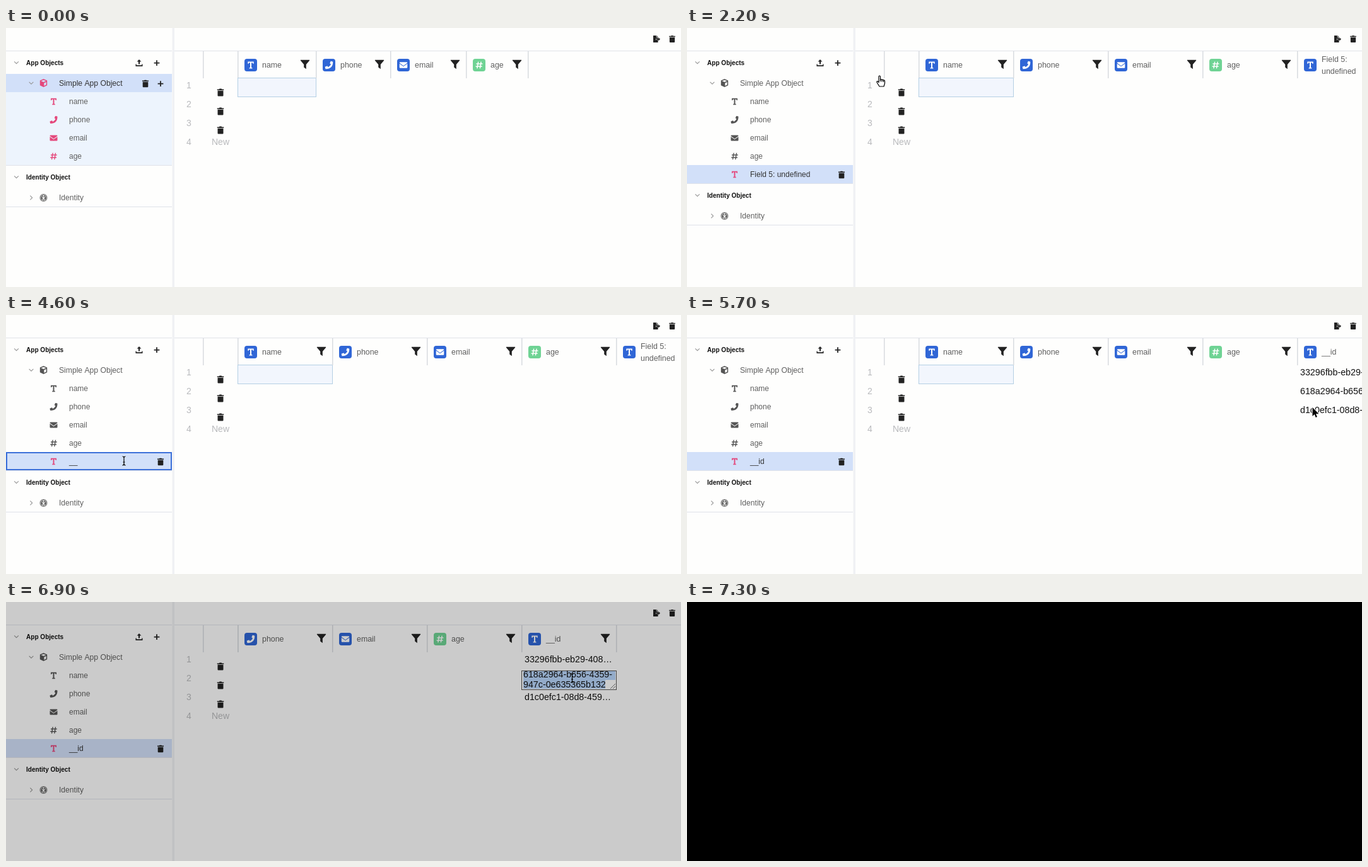
Recreate the animation shown at these times as an HTML page with a canvas. Size 1070x412 px, loop 7400 ms.

```html
<!DOCTYPE html>
<html lang="en">
<meta charset="utf-8">
<title>Object table editor</title>
<style>
html, body { margin: 0; width: 100%; height: 100%; overflow: hidden; background: #fefefd }
canvas { display: block }
</style>
<canvas id="stage" width="1070" height="412"></canvas>
<script>
const c = document.getElementById('stage').getContext('2d');
const LOOP = 7400, SANS = '"Liberation Sans", Arial, sans-serif';
const INK = '#222', GREY = '#606060', PINK = '#e4487c', LINE = '#dfe2e9';
const BLUE = '#3066d6', GREEN = '#6fd394', TEAL = '#6bdbd0', YELLOW = '#f6d261';

// Icons on a 16-unit grid; a second entry is a stroke width.
const ICONS = {
  text: ['M2 1H14V5.2H12V3.2H9.3V13H11V15H5V13H6.7V3.2H4V5.2H2Z'],
  phone: ['M15.4.8L12.2 0Q11.6 0 11.3.4L9.8 4Q9.7 4.5 10 4.8L12 6.4Q10.2 10.2 6.4 12L4.8 10Q4.5 9.7 4 9.8L.4 11.3Q-.1 11.6 0 12.2L.8 15.4Q1 16 1.5 16Q16 15.5 16 1.5Q16 1 15.4.8Z'],
  email: ['M0 3.5Q0 2 1.5 2H14.5Q16 2 16 3.5L8 9.5ZM0 5.2L8 11 16 5.2V12.5Q16 14 14.5 14H1.5Q0 14 0 12.5Z'],
  number: ['M6.3 1L4 15M12 1L9.7 15M2 5.3H15M1 10.7H14', 1.9],
  currency: ['M12 4.5Q11 3 8 3Q4.3 3 4.3 5.4Q4.3 7.4 8 8Q12 8.6 12 10.8Q12 13 8 13Q5 13 4 11.4M8 .5V15.5', 1.9],
  boolean: ['M5 3H11A5 5 0 0 1 11 13H5A5 5 0 0 1 5 3ZM5 4.5H11A3.5 3.5 0 0 1 11 11.5H5A3.5 3.5 0 0 1 5 4.5ZM5.5 5A3 3 0 1 1 5.4 5Z'],
  date: ['M1 2H4V0H6V2H10V0H12V2H15V4.5H1ZM1 5.5H15V15H1Z'],
  time: ['M8 0A8 8 0 1 1 7.9 0ZM7.1 3H8.9V8L11.5 10 10.5 11.3 7.1 8.8Z'],
  datetime: ['M0 2H3V0H5V2H8V0H10V2H12V4.5H0ZM0 5.5H6V14H0ZM11 6A5 5 0 1 1 10.9 6ZM10.3 8H11.7V10.7L13.5 12 12.7 13 10.3 11.5Z'],
  trash: ['M2 4.2H14V14.5Q14 16 12.5 16H3.5Q2 16 2 14.5ZM1 1.2H5L6 0H10L11 1.2H15V3.2H1Z'],
  funnel: ['M.5 0H15.5Q16.3 0 15.8 1L10 8V16L6 13V8L.2 1Q-.3 0 .5 0Z'],
  upload: ['M8 0L13 5H9.5V11H6.5V5H3ZM0 11H2V13.5H14V11H16V16H0Z'],
  leave: ['M0 0H7V4H11V7H6V10H11V16H0ZM8 0L11 3H8ZM12 4.5L16 8.5 12 12.5V9.7H7V7.3H12Z'],
  cube: ['M8 0L15 3V12.5L8 16 1 12.5V3ZM8 2L3 4 8 6 13 4ZM9 8V13.5L13.2 11.5V6Z'],
  person: ['M8 0A8 8 0 1 1 7.9 0ZM8 1.2A6.8 6.8 0 1 1 7.9 1.2ZM8 1.9A6.1 6.1 0 1 1 7.9 1.9ZM8 2.8A1.3 1.3 0 1 1 7.9 2.8ZM4 5.5L7 6.3H9L12 5.5V6.7L9.5 7.5V9L10.8 13H9.5L8 10 6.5 13H5.2L6.5 9V7.5L4 6.7Z'],
  plus: ['M8 1V15M1 8H15', 2.8],
  down: ['M2 5L8 11 14 5', 2],
  right: ['M5 2L11 8 5 14', 2]
};
const CURSORS = {
  arrow: 'M0 0V14L3.2 11 5.2 16 7.4 15 5.4 10.3H10Z',
  point: 'M-1 1Q0-1 1.5 1V6Q3 5 4 6.5Q5.5 5.5 6.5 7Q8.5 6.5 8.5 9V12L7 17H0L-4 10.5Q-4.5 8-2.5 9L-1 10.5Z',
  open: 'M-4 8L-7 2Q-7.5 0-5.5 0L-4 2-5.5-4Q-5-6-3.5-5L-2-1V-6Q-1-8 .5-6.5L1-1 2-6Q3.5-7.5 4.5-5.5L4 0 5.5-3.5Q7.5-4 7.5-2L5.5 5 5 8Z',
  beam: 'M-2.5-7Q0-7 0-5V5Q0 7-2.5 7M2.5-7Q0-7 0-5M0 5Q0 7 2.5 7M-1.5 2H1.5'
};
// time, x, y, shape from then on
const TRACK = [
  [100, 420, 240, 'arrow'], [700, 241, 97, 'point'], [1400, 241, 97, 'point'],
  [1900, 305, 76, 'point'], [2400, 305, 76, 'arrow'], [3100, 187, 232, 'open'],
  [4000, 187, 232, 'beam'], [5000, 187, 232, 'arrow'], [5700, 991.5, 147, 'arrow'],
  [6200, 991.5, 147, 'arrow'], [6400, 897.5, 121, 'beam'], [6900, 897.5, 121, 'beam'],
  [7000, 894, 142, 'arrow'], [7100, 891.5, 161, 'arrow']
];
const FIELDS = [['text', 'name', BLUE], ['phone', 'phone', BLUE], ['email', 'email', BLUE], ['number', 'age', GREEN]];
const MENU = [['Text', BLUE], ['Phone', BLUE], ['Email', BLUE], ['Number', GREEN], ['Currency', GREEN],
  ['Boolean', TEAL], ['Date', YELLOW], ['Time', YELLOW], ['DateTime', YELLOW]];
const IDS = ['33296fbb-eb29-408…', '618a2964-b656-435…', 'd1c0efc1-08d8-459…'];

const clamp = v => Math.min(1, Math.max(0, v));
const ease = v => v * v * (3 - 2 * v);

function box(x, y, w, h, color) { c.fillStyle = color; c.fillRect(x, y, w, h); }

function round(x, y, w, h, r, color) {
  c.fillStyle = color;
  c.beginPath();
  c.roundRect(x, y, w, h, r);
  c.fill();
}

function frame(x, y, w, h, color, width = 1) {
  c.strokeStyle = color;
  c.lineWidth = width;
  c.strokeRect(x, y, w, h);
}

function label(text, x, y, size, color = GREY, weight = '', align = 'left') {
  c.font = `${weight} ${size}px ${SANS}`;
  c.textAlign = align;
  c.fillStyle = color;
  c.fillText(text, x, y);
}

function icon(name, x, y, size, color = INK) {
  const [d, stroke] = ICONS[name], path = new Path2D(d);
  c.save();
  c.translate(x - size / 2, y - size / 2);
  c.scale(size / 16, size / 16);
  c.fillStyle = c.strokeStyle = color;
  c.lineWidth = stroke;
  stroke ? c.stroke(path) : c.fill(path, 'evenodd');
  c.restore();
}

function badge(name, x, y, color) {
  round(x - 10, y - 10, 20, 20, 4, color);
  icon(name, x, y, 12.5, '#fff');
}

function selectRow(y, focused, grip) {
  box(0, y, 263, 29, '#d2e0f9');
  if (focused) frame(1, y + 1, 261, 27, '#3c70d9', 2);
  if (grip) for (const x of [6.5, 9.8]) box(x, y + 9, 1.5, 11, INK);
}

function sidebar(t) {
  const added = t >= 2000, shift = added ? 29 : 0;
  box(0, 36, 263, 1, LINE);
  box(0, 218 + shift, 263, 1, LINE);
  box(0, 284 + shift, 263, 1, LINE);
  box(263.5, 0, 3.5, 412, '#f0f1f4');

  icon('down', 16.5, 55, 9, '#999');
  label('App Objects', 32, 59, 10.05, '#111', 'bold');
  icon('upload', 211, 55.5, 11);
  icon('plus', 239, 55.5, 10);

  if (!added) {
    box(0, 102, 263, 116, '#edf4fd');
    const focused = t >= 1000;
    selectRow(73, focused, focused);
    icon('trash', 221, 88.5, 11.5);
    const hover = t >= 700;
    if (hover) round(233, 76.5, 24, 23.5, 4, '#ee648f');
    icon('plus', 245, 88.5, 10, hover ? '#fff' : INK);
  }
  const tint = added ? '#555' : PINK;
  icon('down', 40, 87.5, 9, '#999');
  icon('cube', 59.5, 87.5, 13, tint);
  label('Simple App Object', 84, 92, 12.15, added ? GREY : '#333');
  FIELDS.forEach(([type, name], i) => {
    icon(type, 75.5, 117 + 29 * i, 12, tint);
    label(name, 100, 121 + 29 * i, 12);
  });

  if (added) {
    selectRow(218, t >= 3500 && t < 5000, t >= 3500 && t < 4000);
    const typed = clamp((t - 4400) / 400) * 4;
    if (t >= 4000 && t < 4500) box(99, 225, 97, 15, '#a9cbfa');
    icon('text', 75.5, 233, 12, PINK);
    label(typed ? '__id'.slice(0, Math.round(typed)) : 'Field 5: undefined', 100, 237, 12, '#333');
    icon('trash', 245, 233.5, 11.5);
  }

  icon('down', 16.5, 237 + shift, 9, '#999');
  label('Identity Object', 32, 241 + shift, 10.05, '#111', 'bold');
  icon('right', 40, 270 + shift, 9, '#999');
  icon('person', 59.5, 270 + shift, 12, '#666');
  label('Identity', 84, 274 + shift, 12.1);
}

function table(t) {
  const added = t >= 2000, named = t >= 5000;
  const widths = added ? [150, 150, 150, 150, 150] : [124, 118, 120, 98];
  const scroll = 150 * ease(clamp((t - 5700) / 500));
  box(267, 36, 803, 1, LINE);
  icon('leave', 1031.5, 17.5, 11);
  icon('trash', 1056, 17.5, 11);
  box(312, 37, 1.5, 43, '#d8dbe0');
  box(367, 37, 1.5, 43, '#d8dbe0');
  for (let i = 0; i < 4; i++) {
    label(i + 1, 290, 96 + 30 * i, 14, '#b9babd', '', 'center');
    if (i < 3) icon('trash', 340, 102.5 + 30 * i, 12);
  }
  label('New', 340, 186, 14.1, '#b9babd', '', 'center');

  c.save();
  c.beginPath();
  c.rect(367, 37, 703, 375);
  c.clip();
  c.translate(-scroll, 0);
  if (t < 6400) {
    box(367.5, 80, widths[0], 29.5, '#f2f6fd');
    frame(367.5, 79.5, widths[0], 30, '#b4cfe4');
  }
  let x = 368;
  widths.forEach((w, i) => {
    const [type, name, color] = FIELDS[i] || ['text', named ? '__id' : '', BLUE];
    badge(type, x + 20, 59, color);
    label(name, x + 38, 63, 12.4);
    if (!name) {
      label('Field 5:', x + 38, 54, 12.4);
      label('undefined', x + 38, 73, 12.4);
    }
    icon('funnel', x + w - 18, 58, 14.5);
    x += w;
    box(x - 1, 37, 1.5, 43, '#d8dbe0');
  });
  if (named) IDS.forEach((id, i) => label(id, 972, 96 + 30 * i, 14.25, '#111'));
  c.restore();

  if (t >= 6500) {
    box(817, 109, 151, 31, '#fff');
    box(820, 110, 146, 14, '#b8d6fb');
    box(820, 124, 130, 14, '#b8d6fb');
    frame(817.5, 109.5, 150, 30, '#555');
    label('618a2964-b656-4359-', 820, 120, 14.25, '#111');
    label('947c-0e635365b132', 820, 136, 14.25, '#111');
    c.strokeStyle = '#777';
    c.stroke(new Path2D('M958 138L966 130M962 138L966 134'));
  }
}

function menu(t) {
  if (t < 1300 || t >= 2000) return;
  const opening = t < 1400;
  c.save();
  c.globalAlpha = opening ? .9 : 1;
  c.shadowColor = 'rgba(0,0,0,.3)';
  c.shadowBlur = 8;
  c.shadowOffsetY = 2;
  round(261, 46, 151, 380, 4, '#fff');
  c.shadowColor = 'transparent';
  MENU.forEach(([name, color], i) => {
    const y = 73 + 39.5 * i;
    c.globalAlpha = !opening ? 1 : i < 8 ? .95 : .65;
    badge(name.toLowerCase(), 283, y, color);
    label(name, 300, y + 4, 11.95, '#333');
  });
  c.restore();
}

function cursor(t) {
  if (t < TRACK[0][0]) return;
  const n = TRACK.findLastIndex(k => k[0] <= t);
  const [t0, x0, y0, shape] = TRACK[n], [t1, x1, y1] = TRACK[n + 1] || [LOOP, x0, y0];
  const p = ease((t - t0) / (t1 - t0)), path = new Path2D(CURSORS[shape]);
  c.save();
  c.translate(x0 + (x1 - x0) * p, y0 + (y1 - y0) * p);
  c.lineJoin = 'round';
  if (shape === 'arrow') {
    c.strokeStyle = '#fff';
    c.lineWidth = 2;
    c.stroke(path);
    c.fillStyle = '#000';
    c.fill(path);
  } else {
    c.fillStyle = '#fff';
    if (shape !== 'beam') c.fill(path);
    c.strokeStyle = '#000';
    c.lineWidth = 1.2;
    c.stroke(path);
    if (shape === 'point') c.stroke(new Path2D('M1.5 6V9M4 6.5V9.5M6.5 7V10'));
  }
  c.restore();
}

function draw(now) {
  const t = Math.floor(now % LOOP / 100) * 100;
  box(0, 0, 1070, 412, '#fefefd');
  sidebar(t);
  table(t);
  menu(t);
  cursor(t);
  box(0, 0, 1070, 412, `rgba(0,0,0,${clamp((t - 6800) / 500)})`);
  requestAnimationFrame(draw);
}
requestAnimationFrame(draw);
</script>
</html>
```
